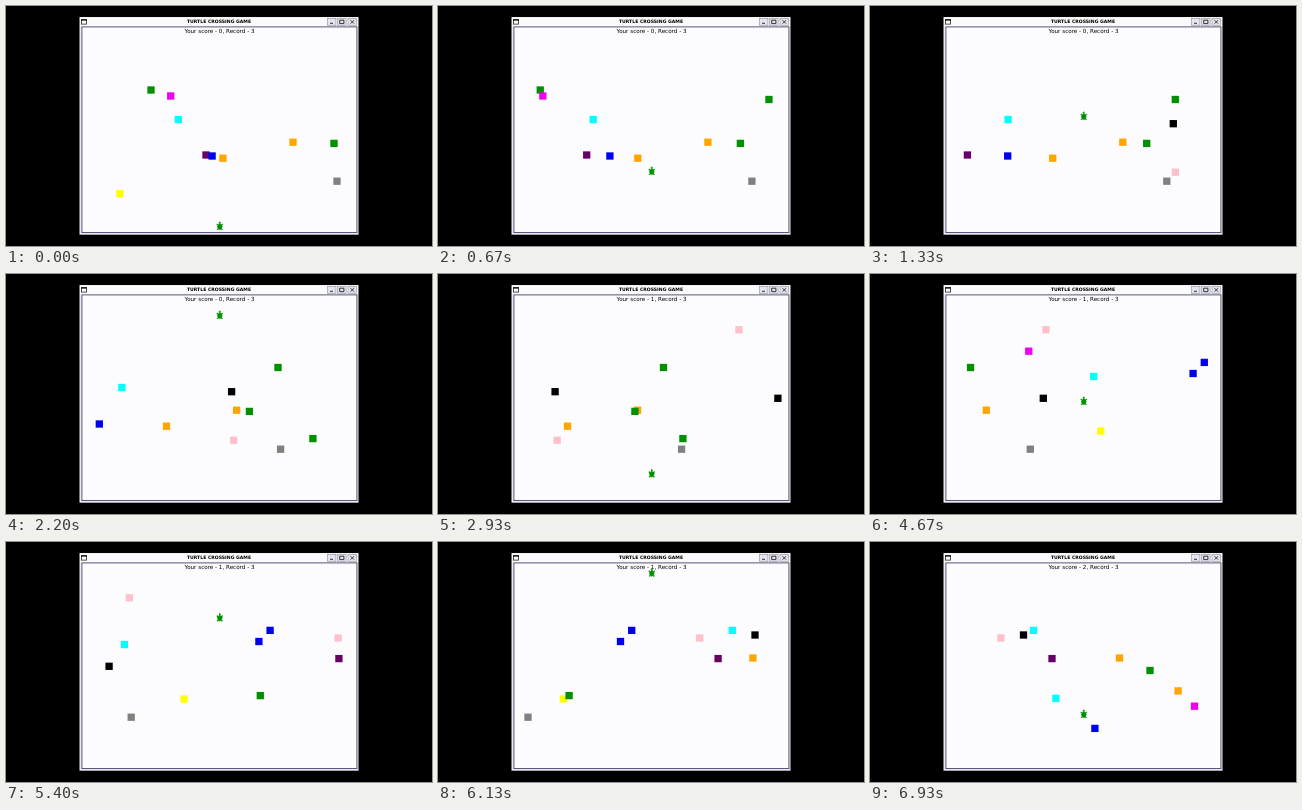
An HTML page for the animation above (6990 ms loop, 426x240 px).

```html
<!DOCTYPE html>
<html lang="en">
<head>
<meta charset="utf-8">
<title>Turtle crossing game</title>
<style>
  html, body { margin: 0; width: 100%; height: 100%; overflow: hidden; background: #000; }
  svg { display: block; width: 100vw; height: 100vh; }
  text { font-family: "DejaVu Sans", sans-serif; text-anchor: middle; fill: #000; }
  .title { font-size: 4.6px; font-weight: bold; }
  .score { font-size: 5.62px; }
  .button rect { fill: #e4e4ee; stroke: #9c9ca8; stroke-width: .7; }
  .button path { fill: none; stroke: #222; stroke-width: .9; }
</style>
</head>
<body>
<svg viewBox="0 0 426 240">
  <rect width="426" height="240" fill="#000"/>
  <rect x="73.5" y="11" width="279" height="217.7" fill="#ececf0"/>
  <rect x="74" y="11.5" width="278" height="9" fill="#fafafc"/>
  <rect x="75.9" y="20.9" width="275" height="205.6" fill="#fcfcfe" stroke="#58587c" stroke-width="1"/>

  <rect x="75.5" y="13.5" width="5" height="4.6" fill="#fff" stroke="#222" stroke-width=".8"/>
  <path d="M75.2 14h5.6" stroke="#111" stroke-width="1.3"/>
  <text class="title" x="213" y="17.4">TURTLE CROSSING GAME</text>
  <g class="button"><rect x="321.5" y="12.5" width="8.4" height="6.8"/><path d="M324 17.3h3"/></g>
  <g class="button"><rect x="331.5" y="12.5" width="8.6" height="6.8"/><path d="M333.7 14.2h4.2v3.4h-4.2z"/></g>
  <g class="button"><rect x="342" y="12.5" width="8.6" height="6.8"/><path d="M344.6 14.2l3.4 3.4m0-3.4l-3.4 3.4"/></g>

  <text class="score" id="score" x="213.5" y="26.6"></text>
  <g id="cars"></g>
  <path id="turtle" fill="#009000" stroke="#009000" stroke-width=".6"/>
</svg>
<script>
const LOOP = 6990, STEP = LOOP / 105;
const SPAWN_X = 342.5, EXIT_X = 86, SIZE = 7.3;
const COLORS = {
  green: '#009000', magenta: '#f000f0', cyan: '#00ffff', purple: '#680068', blue: '#0000f0',
  orange: '#ffa500', gray: '#808080', yellow: '#ffff00', black: '#000', pink: '#ffc0cb'
};

// colour, y, speed, distance clock at spawn
const CARS = [
  ['green', 84, 5, -39.5], ['magenta', 90, 7, -25.4], ['cyan', 113.5, 2, -85.1],
  ['purple', 149, 6, -23.75], ['blue', 150, 4, -34.1], ['orange', 152.2, 2, -62.8],
  ['orange', 136.2, 2, -27.75], ['green', 137.4, 3, -4.83], ['gray', 175.2, 2, -5.75],
  ['yellow', 187.8, 6, -38.1],
  ['green', 93.5, 3, 4.7], ['black', 117.7, 7, 11.5], ['pink', 166.2, 7, 11.8],
  ['green', 164.6, 4, 19.3], ['pink', 55.8, 3, 29.85], ['black', 124.3, 4, 43.05],
  ['yellow', 157, 3, 48.1], ['magenta', 77.2, 5, 48.6], ['cyan', 102.5, 6, 65.55],
  ['blue', 99.5, 4, 80.5], ['blue', 88.4, 4, 83.3], ['green', 153.6, 7, 90.3],
  ['purple', 116.6, 3, 99.7], ['pink', 96, 4, 100.3],
  ['orange', 116, 2, 106.7], ['cyan', 88.4, 4, 108.45], ['black', 93, 5, 115.4],
  ['green', 128.5, 2, 121.95], ['cyan', 156.3, 6, 127.1], ['blue', 186.4, 6, 133.6],
  ['orange', 148.9, 4, 144.6], ['magenta', 164.2, 3, 147.2]
];

// Traffic speeds up after every crossing
const CLOCK = [[0, 0], [20, 17.1], [33, 28.2], [35.8, 30.6], [44, 43.7], [59, 67.8],
  [81, 102.9], [93, 122.1], [104, 153.2]];
const WALK = [[0, 220], [20, 110], [33, 41], [35.8, 26], [35.8, 220], [44, 199.5],
  [59, 178.5], [81, 75.5], [92.9, 27], [92.9, 220], [104, 172]];
const CROSSINGS = [35.8, 92.9];

// Right half of the turtle, nose first
const HALF = [[0, 16], [2, 14], [1, 10], [4, 7], [7, 9], [9, 8], [6, 5], [7, 1], [5, -3],
  [8, -6], [6, -8], [4, -5], [0, -7]];

const byId = id => document.getElementById(id);
const score = byId('score'), turtle = byId('turtle');

const outline = HALF.concat(HALF.slice(1, -1).reverse().map(([x, y]) => [-x, y]));
turtle.setAttribute('d', 'M' + outline.map(([x, y]) => `${x * .343} ${-y * .343}`).join('L') + 'Z');

const cars = CARS.map(([color, y, speed, born]) => {
  const node = document.createElementNS('http://www.w3.org/2000/svg', 'rect');
  node.setAttribute('width', SIZE);
  node.setAttribute('height', SIZE);
  node.setAttribute('y', y - SIZE / 2);
  node.setAttribute('fill', COLORS[color]);
  byId('cars').append(node);
  return { node, speed, born };
});

function lerp(points, n) {
  let i = 0;
  while (i < points.length - 2 && n >= points[i + 1][0]) i++;
  const [a, from] = points[i], [b, to] = points[i + 1];
  return from + (to - from) * (n - a) / (b - a);
}

function draw(ms) {
  const n = Math.min(104, Math.floor((ms % LOOP + 5) / STEP));
  const clock = lerp(CLOCK, n);
  for (const { node, speed, born } of cars) {
    const x = SPAWN_X - speed * (clock - born);
    node.setAttribute('x', x - SIZE / 2);
    node.setAttribute('visibility', clock >= born && x >= EXIT_X ? 'visible' : 'hidden');
  }
  turtle.setAttribute('transform', `translate(213.8 ${lerp(WALK, n) + 1.2})`);
  const points = CROSSINGS.filter(t => n >= t).length;
  score.textContent = `Your score - ${points}, Record - 3`;
}

const start = performance.now();
function tick() {
  draw(performance.now() - start);
  requestAnimationFrame(tick);
}
tick();
</script>
</body>
</html>
```
